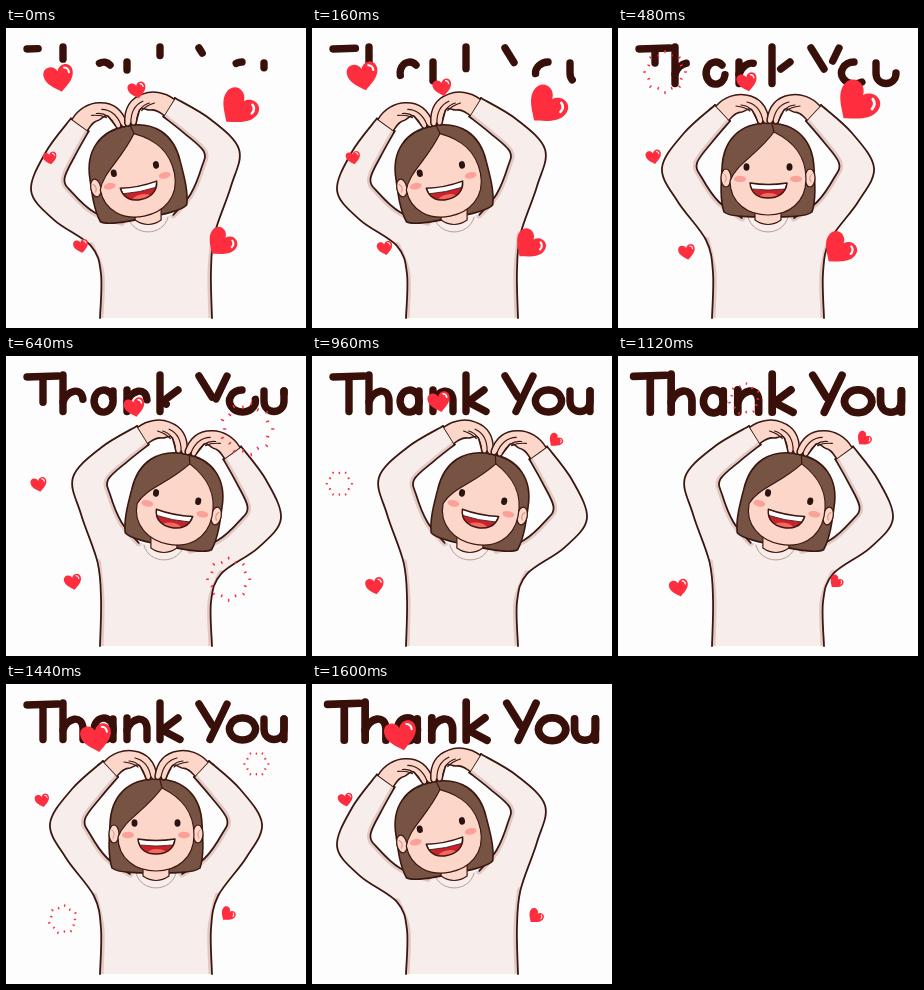
Write an HTML page with a canvas that moves like this. It is 300 by 300 pixels and loops after 1.92 s.

```html
<!DOCTYPE html>
<html lang="en">
<head>
<meta charset="utf-8">
<title>Thank You</title>
<style>
html, body { margin: 0; width: 100%; height: 100%; overflow: hidden; background: #fdfdfd; }
canvas { display: block; width: 300px; height: 300px; }
</style>
</head>
<body>
<canvas id="stage" width="300" height="300" role="img" aria-label="Thank You"></canvas>
<script>
const ctx = document.getElementById('stage').getContext('2d');
const INK = '#3b1712', SKIN = '#fbd6c9', HAIR = '#775344', KNIT = '#f7eeeb', SHADE = '#e3c9c4', RED = '#fe2e3e';
const STEP = 160, LOOP = 1920, TILT = .195;

// Each letter is a list of pen strokes; all letters are written at once.
const stem = (x, top) => `M${x} ${top}V55.5`;
const arch = x => `M${x} 46c4-12 19-16 20-2v11.5`;
const LETTERS = [
  ['M21 21L52 20', stem(37, 21)],
  [stem(57, 19), arch(57)],
  ['M104 37a9.5 11 0 1 0 2 3', stem(107, 35)],
  [stem(121, 34), arch(121)],
  [stem(154, 19), 'M172 34L156 46L174 55.5'],
  ['M193 20L206 41', 'M221 20L204 55.5'],
  ['M236 34a13 11 0 1 0 1 0'],
  ['M258 35v10c0 14 20 14 20 0v-10', stem(278, 35)]
].map(strokes => strokes.map(d => {
  const el = document.createElementNS('http://www.w3.org/2000/svg', 'path');
  el.setAttribute('d', d);
  return { path: new Path2D(d), len: el.getTotalLength() };
}));

// x, y, width, first step, burst step
const HEARTS = [
  [53, 50, 28, 0, 3], [131, 62, 17, 0, 7], [232, 80, 36, 0, 4], [44, 130, 13, 0, 6], [75, 218, 14, 0, 9],
  [215, 215, 28, 0, 4], [241, 86, 13, 5, 9], [218, 226, 13, 7, 12], [92, 56, 28, 8, 12], [39, 117, 13, 8, 12]
];
const HEART = new Path2D('M0 .5C-.2 .33-.53 .14-.53-.17C-.53-.5-.12-.54 0-.25C.12-.54 .53-.5 .53-.17C.53 .14 .2 .33 0 .5Z');

// Left sleeve: wrist to hem, and wrist to shoulder.
const OUTER = [[97, 77], [66, 105], [44, 140], [60, 174], [88, 212], [95, 245], [94, 290]];
const INNER = [[112, 93], [95, 113], [79, 135], [84, 150], [101, 174], [124, 190]];
const flip = pts => pts.map(([x, y]) => [300 - x, y]);

// Sways a point about the waist; the hem stays put.
function bend([x, y], tilt) {
  const a = tilt * Math.max(0, Math.min(1, (250 - y) / 80)), c = Math.cos(a), s = Math.sin(a);
  return [150 + (x - 150) * c - (y - 248) * s, 248 + (x - 150) * s + (y - 248) * c];
}

// Adds a smooth curve through points.
function curve(pts, path = new Path2D(), join = false) {
  const at = i => pts[Math.max(0, Math.min(pts.length - 1, i))];
  path[join ? 'lineTo' : 'moveTo'](...at(0));
  for (let i = 0; i < pts.length - 1; i++) {
    const [a, b, c, d] = [at(i - 1), at(i), at(i + 1), at(i + 2)];
    path.bezierCurveTo(b[0] + (c[0] - a[0]) / 6, b[1] + (c[1] - a[1]) / 6,
      c[0] - (d[0] - b[0]) / 6, c[1] - (d[1] - b[1]) / 6, ...c);
  }
  return path;
}

function draw(shape, fill, line, width = 1.6) {
  const path = typeof shape === 'string' ? new Path2D(shape) : shape;
  if (fill) { ctx.fillStyle = fill; ctx.fill(path); }
  if (line) { ctx.strokeStyle = line; ctx.lineWidth = width; ctx.stroke(path); }
}

function oval(x, y, rx, ry, fill, line) {
  const path = new Path2D();
  path.ellipse(x, y, rx, ry, 0, 0, 7);
  draw(path, fill, line, 1.2);
}

function sweater(tilt) {
  const [outL, innL, outR, innR] = [OUTER, INNER, flip(OUTER), flip(INNER)]
    .map(pts => pts.map(p => bend(p, tilt)));
  const body = curve(outL);
  curve(outR.slice().reverse(), body, true);
  curve(innR, body, true);
  curve(innL.slice().reverse(), body, true);
  draw(body, KNIT);
  ctx.save();
  ctx.clip(body);
  for (const side of [innL, innR, outL.slice(4), outR.slice(4)]) draw(curve(side), null, SHADE, 7);
  ctx.restore();
  for (const line of [outL, outR, innL, innR, [outL[0], innL[0]], [outR[0], innR[0]]]) draw(curve(line), null, INK, 1.8);

  const [x] = bend([150, 192], tilt);
  draw(`M${x - 20} 189C${x - 15} 209 ${x + 15} 209 ${x + 20} 189`, KNIT, '#b79c95', 1);
  return x;
}

function hand() {
  draw('M-52-70C-44-79-32-83-22-81C-9-79-1-70 1-56C1-52-3-51-5-55C-6-51-10-51-11-56L-16-66' +
    'C-19-69-22-65-26-64C-32-64-35-60-39-56', SKIN, INK, 1.5);
  draw('M-21-74Q-8-71-5-55M-27-71Q-15-70-11-56M-32-70Q-23-69-18-65', null, INK, 1.2);
}

function face(tilt) {
  for (const s of [-1, 1]) if (s * tilt >= 0) {
    oval(s * 42, 2, 5, 9, SKIN, INK);
    draw(`M${s * 44}-2Q${s * 40} 1 ${s * 43} 6`, null, '#d98f80', 1);
  }
  draw('M6-44C26-34 38-20 38 3C38 27 20 39 0 39C-20 39-38 27-38 5C-32-12-12-20 6-44Z', SKIN, INK, 1.2);
  draw('M4-52L6-44', null, INK, 1.2);
  for (const s of [-1, 1]) {
    oval(s * 21.5, -9, 3, 3.8, '#2a1412');
    oval(s * 28, 3, 6, 3.2, '#fba199');
  }
  const mouth = new Path2D('M-18 7Q0 10 19 7C18 18 9 22 0 22C-9 22-17 18-18 7Z');
  draw(mouth, '#c9222b');
  ctx.save();
  ctx.clip(mouth);
  oval(1, 22, 10, 5, '#f4685f');
  draw('M-19 4H20L17 13Q0 15-16 13Z', '#fff', INK, .8);
  ctx.restore();
  draw(mouth, null, INK, 1.5);
}

// Runs a drawing in head coordinates, tilted with the body.
function onHead(tilt, paint) {
  ctx.save();
  ctx.translate(150, 248);
  ctx.rotate(tilt);
  ctx.translate(0, -100);
  paint(tilt);
  ctx.restore();
}

function person(step) {
  const tilt = TILT * (step < 2 || step > 9 ? -1 : step < 4 || step > 7 ? 0 : 1);
  const neck = sweater(tilt);
  onHead(tilt, () => draw('M0-53C28-53 45-36 46-8C47 8 48 24 44 36C38 41 18 41 0 41' +
    'C-18 41-38 41-44 36C-48 24-47 8-46-8C-45-36-28-53 0-53Z', HAIR, INK));
  draw(`M${neck - 13} 178V192Q${neck} 201 ${neck + 13} 192V178`, SKIN, INK, 1.2);
  onHead(tilt, () => {
    face(tilt);
    hand();
    ctx.scale(-1, 1);
    hand();
  });
}

function lettering(step) {
  const size = step === 7 || step > 9 ? 1.042 : 1;
  ctx.save();
  ctx.translate(149.5, 38);
  ctx.scale(size, size);
  ctx.translate(-149.5, -38);
  LETTERS.forEach((strokes, i) => {
    const part = step < 5 ? .17 + step * .172 - i * .015 : 1;
    let left = part * strokes.reduce((sum, s) => sum + s.len, 0);
    for (const { path, len } of strokes) {
      if (left <= .1) break;
      ctx.setLineDash(left < len ? [left, 999] : []);
      draw(path, null, '#380f09', 7.4);
      left -= len;
    }
  });
  ctx.restore();
}

function burst(r) {
  const n = Math.round(6 + r / 2);
  for (let i = 0; i < n; i++) {
    ctx.rotate(2 * Math.PI / n);
    const d = i % 2 ? r : r * .85;
    draw(`M${d} 0h${r / 12}`, null, RED, 1.5);
  }
}

// Hearts drift away from the middle while growing, then burst.
function hearts(step) {
  for (const [x, y, w, first, last] of HEARTS) {
    if (step < first || step > last) continue;
    const n = step - first, size = w * (1 + .04 * n), away = 2.8 * n / Math.hypot(x - 150, y - 145);
    ctx.save();
    ctx.translate(x + (x - 150) * away, y + (y - 145) * away);
    if (step === last) burst(size / 2 + 4);
    else {
      ctx.rotate(x > 200 ? .7 : -.2);
      ctx.scale(size, size);
      draw(HEART, RED);
      draw('M.25-.33Q.4-.29 .39-.13', null, '#fff', .07);
    }
    ctx.restore();
  }
}

function frame(now) {
  const step = Math.min(10, Math.floor((now - start) % LOOP / STEP));
  ctx.fillStyle = '#fdfdfd';
  ctx.fillRect(0, 0, 300, 300);
  person(step);
  lettering(step);
  hearts(step);
  requestAnimationFrame(frame);
}

ctx.lineCap = ctx.lineJoin = 'round';
const start = performance.now();
frame(start);
</script>
</body>
</html>
```
